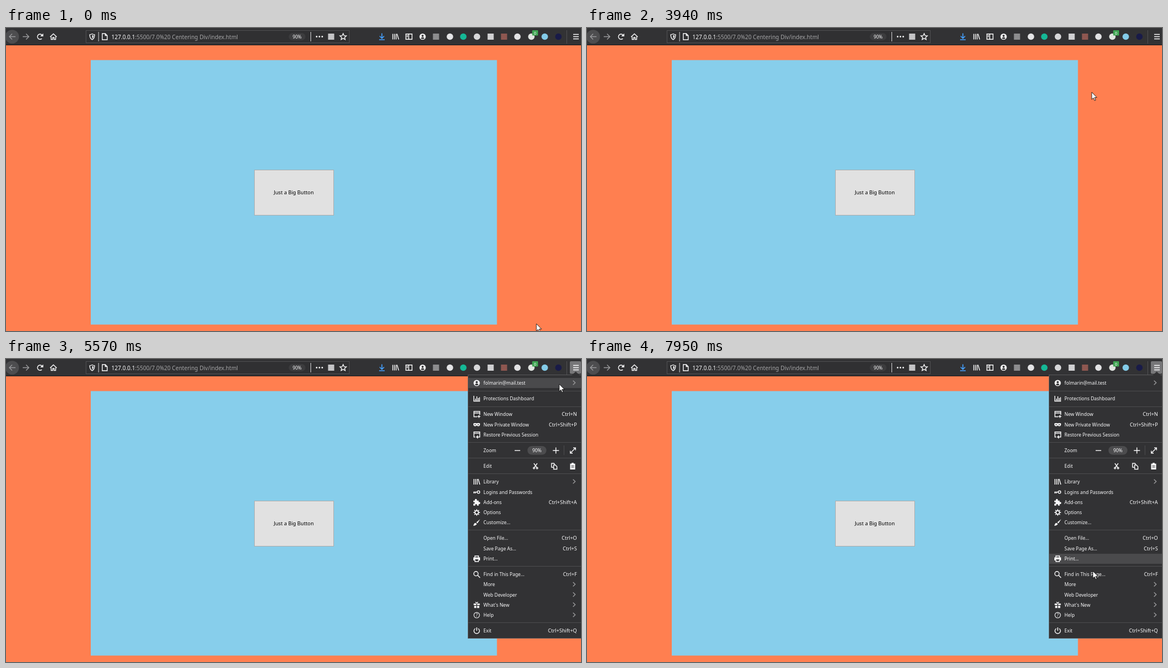
Recreate the animation shown at these times as an HTML page. Size 1031 px wide and 543 px high, loop 8000 ms.

```html
<!DOCTYPE html>
<html lang="en">
<head>
<meta charset="utf-8">
<title>Centering Div</title>
<style>
  html, body { margin: 0; width: 100%; height: 100%; overflow: hidden; background: #ff7f50; }
  svg { display: block; }
  text { font-family: "Noto Sans", "Open Sans", sans-serif; fill: #f9f9fa; white-space: pre; }
  .line { fill: none; stroke: #f9f9fa; stroke-width: 1.4; }
  .solid { fill: #f9f9fa; stroke: none; }
  .hole { fill: #323234; stroke: none; }
  .grey { stroke: #98989a; }
  #menu text { font-size: 8.45px; }
  #menu .key { font-size: 9.1px; text-anchor: end; }
</style>
</head>
<body>
<svg width="1031" height="543" viewBox="0 0 1031 543">
  <rect width="1031" height="543" fill="#ff7f50"/>
  <rect x="152" y="57.5" width="728.3" height="474" fill="#87ceeb"/>
  <rect id="big" x="445.5" y="254.5" width="142" height="81"/>
  <text x="516" y="298" font-size="9.2" text-anchor="middle" style="fill:#000">Just a Big Button</text>

  <rect width="1031" height="31" fill="#323234"/>
  <rect y="30" width="1031" height="1" fill="#1c1c1e"/>
  <circle cx="11" cy="15.5" r="12.3" fill="#4d4d4f"/>
  <rect x="143.5" y="4.5" width="472" height="22" fill="#303032" stroke="#505052"/>
  <rect x="507" y="9" width="30" height="13" rx="6.5" fill="#3c3c3e"/>
  <path d="M166 7V24M546.5 7V24" stroke="#d8d8da"/>
  <path d="M1005.5 4V28" stroke="#505052"/>
  <text x="189" y="19.6" font-size="10.06">127.0.0.1<tspan fill="#a4a4a6">:5500/7.0%20 Centering Div/index.html</tspan></text>
  <text x="522" y="18.6" font-size="8.1" text-anchor="middle">90%</text>
  <g id="bar"></g>
  <rect id="burger" x="1011" y="4" width="20" height="22.5" rx="2"/>
  <path class="line" d="M1017 11.5h10M1017 15.5h10M1017 19.5h10"/>

  <g id="menu">
    <rect x="828.5" y="28.5" width="204" height="472" fill="#323234" stroke="#58585a"/>
    <path class="late" d="M1014 29.5L1021.5 22.5L1029 29.5Z" fill="#323234"/>
    <rect id="hover" x="829" width="202" height="18" fill="#4a4a4c"/>
    <g id="items"></g>
  </g>
  <path id="cursor" d="M0 0V13L3 10.3L5.1 15L7.1 14.2L5 9.6H9.2Z" fill="#fff" stroke="#000" stroke-width=".8"/>
</svg>
<script>
const $ = id => document.getElementById(id);
const line = (d, cls = '') => `<path class="line ${cls}" d="${d}"/>`;
const solid = d => `<path class="solid" fill-rule="evenodd" d="${d}"/>`;
const at = (x, y, art, cls = '') => `<g class="${cls}" transform="translate(${x} ${y})">${art}</g>`;
const dot = (x, color) => `<circle cx="${x}" cy="15.5" r="5.8" fill="${color}"/>`;
const block = (x, color) => `<rect x="${x - 5.5}" y="10" width="11" height="11" fill="${color}"/>`;

const account = `<circle r="5.6" class="solid"/><circle cy="-1.5" r="1.9" class="hole"/>
  <path class="hole" d="M-3.2 3.2Q-2.6 1 0 1Q2.6 1 3.2 3.2Q0 5.4 -3.2 3.2Z"/>`;
const books = line('M-5 -5V5M-2 -5V5M1 -5V5M2.6 -5L5.6 5');
const frame = 'V-5H5.5V';
const icons = {
  account, books,
  chart: line('M-5.2 -5V4.5H6M-2.2 3.5V0M.3 3.5V-4M2.7 3.5V-1M5 3.5V-2.5'),
  window: line(`M1 4.5H-5${frame}1M-5 -2.3H5.5M4 1.5v5M1.5 4h5`),
  mask: solid('M-6 -2Q-3 -3.6 0 -2.2Q3 -3.6 6 -2Q6.2 3 3 3Q1.2 3 0 1.4Q-1.2 3 -3 3Q-6.2 3 -6 -2ZM-4.3 0Q-2.8 -1.8 -1.3 .3Q-3 1.6 -4.3 0ZM4.3 0Q2.8 -1.8 1.3 .3Q3 1.6 4.3 0Z'),
  restore: line(`M-2.5 4H-5${frame}4H0M-5 -2.3H5.5M2.2 1.5L-.3 4L2.2 6.5`),
  key: line('M1 0H-6M-5 0V2.5M-2.5 0V2.5') + '<circle class="line" cx="3.2" r="2.3"/>',
  puzzle: solid('M-6 -3H-3.2Q-4 -6 -1.5 -6Q1 -6 .2 -3H3.5V-.2Q6.4 -1 6.4 1.4Q6.4 3.8 3.5 3V6H.6Q1 3.4 -1 3.4Q-3 3.4 -2.6 6H-6V2.6Q-3.4 3 -3.4 1.2Q-3.4 -.6 -6 0Z'),
  gear: line('M0 -6V6M-6 0H6M-4.2 -4.2L4.2 4.2M-4.2 4.2L4.2 -4.2') + '<circle r="3.1" class="hole" style="stroke:#f9f9fa;stroke-width:1.6"/>',
  brush: solid('M6.2 -6.2L1.4 1.4L-.8 -.4ZM-6 5.8Q-5 .6 -2 .6L.2 2.4Q-.6 5 -6 5.8Z'),
  printer: line('M-3.3 -2V-5H3.3V-2') + solid('M-6 -2.4H6V3H3.6V1H-3.6V3H-6Z') + line('M-3.2 1.5V5H3.2V1.5'),
  search: '<circle class="line" cx="-1.3" cy="-1.3" r="3.9"/>' + line('M1.6 1.6L6 6'),
  gift: solid('M-5.5 -2.5H-.7V.3H-5.5ZM.7 -2.5H5.5V.3H.7ZM-4.5 1.5H-.7V5.5H-4.5ZM.7 1.5H4.5V5.5H.7Z') + line('M0 -3L-2.2 -5.2M0 -3L2.2 -5.2'),
  help: '<circle class="line" r="5" style="stroke-width:1.1"/><text y="3" text-anchor="middle">?</text>',
  power: line('M-2.6 -4A4.9 4.9 0 1 0 2.6 -4M0 -6V0')
};

$('bar').innerHTML =
  at(11, 15.5, line('M6 0H-5M0 -5L-5 0L0 5', 'grey')) +
  at(36, 15.5, line('M-6 0H5M0 -5L5 0L0 5', 'grey')) +
  at(61, 15.5, line('M3.2 3.4A4.6 4.6 0 1 1 3.6 -2.7') + solid('M5.8 -5.8V-.4H.4Z')) +
  at(85, 15.5, line('M-6 .5L0 -5L6 .5M-4 0V5H-1.2V1.5H1.2V5H4V0')) +
  at(154.5, 15.5, line('M0 -5Q2.5 -3.6 4.3 -3.6Q4.4 3 0 5.4Q-4.4 3 -4.3 -3.6Q-2.5 -3.6 0 -5Z') + solid('M0 -3Q2 -2 2.6 -2Q2.4 1.8 0 3.4Z')) +
  at(177, 15.5, line('M-4.4 -5.5H1L4.5 -2V5.5H-4.4ZM1 -5.5V-2H4.5')) +
  [557, 562, 567].map(x => `<circle class="solid" cx="${x}" cy="15.5" r="1.4"/>`).join('') +
  block(583, '#c4c4c6') +
  at(604.5, 15.5, line('M0 -5.6L1.7 -1.8L5.8 -1.4L2.7 1.3L3.6 5.2L0 3.1L-3.6 5.2L-2.7 1.3L-5.8 -1.4L-1.7 -1.8Z')) +
  at(674, 15.5, '<g style="fill:none;stroke:#45a1ff;stroke-width:1.6"><path d="M0 -6V3M-4 -1L0 3L4 -1M-5 5.5H5"/></g>') +
  at(698.5, 15.5, books) +
  at(722.5, 15.5, line('M-5.5 -4.8H5.5V4.8H-5.5ZM-.5 -4.8V4.8M-4 -2H-2M-4 0H-2')) +
  at(747, 15.5, account) +
  block(771, '#8c8c8e') + dot(796, '#e4e4e6') + dot(820, '#15b896') + dot(844.5, '#d6d6d8') +
  block(869, '#d0d0d2') + block(893, '#8e5750') + dot(917, '#e2e2e4') + dot(942, '#e0e4e0') +
  '<rect x="943.5" y="4" width="10.5" height="9.5" rx="1" fill="#3fa552"/><text x="948.7" y="11.5" font-size="7.5" text-anchor="middle">0</text>' +
  dot(966, '#83cbe8') + dot(990.5, '#191b48');

// y, label, shortcut ('>' opens a submenu), icon
const rows = [
  [43, 'folmarin@mail.test', '>', 'account'],
  [71, 'Protections Dashboard', '', 'chart'],
  [99, 'New Window', 'Ctrl+N', 'window'],
  [117.5, 'New Private Window', 'Ctrl+Shift+P', 'mask'],
  [135.7, 'Restore Previous Session', '', 'restore'],
  [164, 'Zoom'], [192, 'Edit'],
  [220, 'Library', '>', 'books'],
  [238.5, 'Logins and Passwords', '', 'key'],
  [256.7, 'Add-ons', 'Ctrl+Shift+A', 'puzzle'],
  [275, 'Options', '', 'gear'],
  [293.2, 'Customize...', '', 'brush'],
  [321.3, 'Open File...', 'Ctrl+O'],
  [339.6, 'Save Page As...', 'Ctrl+S'],
  [358, 'Print...', '', 'printer'],
  [386, 'Find in This Page...', 'Ctrl+F', 'search'],
  [404.3, 'More', '>'], [422.6, 'Web Developer', '>'],
  [440.8, "What's New", '>', 'gift'],
  [459, 'Help', '>', 'help'],
  [487, 'Exit', 'Ctrl+Shift+Q', 'power']
];
const early = ['account', 'books', 'puzzle', 'gear', 'search'];

$('items').innerHTML = rows.map(([y, label, key, icon]) =>
  `<text x="856" y="${y + 3}">${label}</text>` +
  (key === '>' ? at(1019, y - .5, line('M-2.3 -3.8L1.6 0L-2.3 3.8', 'grey'), 'late')
    : key ? `<text class="key" x="1023.7" y="${y + 3}">${key}</text>` : '') +
  (icon ? at(844, y, icons[icon], early.includes(icon) ? '' : 'late') : '')
).join('') +
  [57, 85, 149, 177, 205, 306, 371, 472].map(y => `<path d="M829 ${y + .5}H1031" stroke="#4c4c4e"/>`).join('') +
  '<path d="M1000.5 155V172" stroke="#4c4c4e"/><rect x="935" y="156" width="34" height="15.5" rx="7.7" fill="#4c4c4e"/>' +
  '<text x="952" y="167" text-anchor="middle">90%</text>' +
  at(917, 164, line('M-5 0H5'), 'late') +
  at(986, 164, line('M-5.5 0H5.5M0 -5.5V5.5'), 'late') +
  at(1016.5, 164, line('M-4.5 4.5L4.5 -4.5M.5 -4.7H4.7V-.5M-.5 4.7H-4.7V.5'), 'late') +
  at(949.5, 192, line('M-3 -5L2.2 2.5M3 -5L-2.2 2.5') + '<circle class="line" cx="-2.8" cy="3.6" r="1.3"/><circle class="line" cx="2.8" cy="3.6" r="1.3"/>', 'late') +
  at(983, 192, line('M-1.5 2H-4.8V-5H-.5L1 -3M-1 -2H2L4.8 .8V5.5H-1Z'), 'late') +
  at(1016, 192, solid('M-4.5 -4.5H-1.8V-6H1.8V-4.5H4.5V6H-4.5ZM-2.5 -1H2.5V0H-2.5ZM-2.5 1.5H2.5V2.5H-2.5Z'), 'late');

// start, end, steps, points along the way
const moves = [
  [0, 0, 1, [[951, 530]]],
  [70, 130, 2, [[912, 495], [885, 471]]],
  [2470, 3160, 10, [[815, 461], [762, 458], [735, 440], [706, 417], [663, 370], [626, 345], [590, 322], [565, 308], [550, 301], [545, 298]]],
  [3460, 3620, 3, [[573, 300], [645, 296], [755, 272]]],
  [3940, 4640, 10, [[905, 115], [950, 72], [980, 40], [998, 20], [1007, 10]]],
  [4870, 4870, 1, [[1017, 13]]],
  [5020, 5020, 1, [[1017, 19]]],
  [5570, 6340, 11, [[992, 45], [968, 92], [946, 152], [925, 212], [908, 257], [900, 273]]],
  [6420, 6650, 4, [[900, 274], [902, 275]]],
  [7180, 7950, 11, [[912, 221], [916, 172], [918, 140], [918, 133], [917, 150], [916, 178], [914, 215], [912, 258], [910, 300], [908, 342], [907, 380]]]
];
const path = moves.flatMap(([start, end, steps, pts]) => Array.from({ length: steps }, (_, i) => {
  const u = i / Math.max(1, steps - 1), s = u * (pts.length - 1), k = Math.floor(s);
  const a = pts[k], b = pts[k + 1] || a, mix = j => Math.round(a[j] + (b[j] - a[j]) * (s - k));
  return { time: Math.round(start + u * (end - start)), x: mix(0), y: mix(1) };
}));

function draw(t) {
  const n = path.findLastIndex(p => p.time <= t), { x, y } = path[n];
  $('cursor').setAttribute('transform', `translate(${x} ${y})`);

  const over = x > 445 && x < 587 && y > 254 && y < 335;
  $('big').setAttribute('fill', over ? '#e5f1fb' : '#e1e1e1');
  $('big').setAttribute('stroke', over ? '#0078d7' : '#adadad');
  $('burger').setAttribute('fill', t >= 5020 ? '#767678' : x > 1004 && y < 28 ? '#505052' : 'none');

  const fade = t < 5097 ? 0 : t < 5173 ? .24 : t < 5250 ? .72 : 1;
  $('menu').setAttribute('opacity', fade);
  $('menu').setAttribute('transform', `translate(0 ${fade < .5 ? -2 : fade < 1 ? -1 : 0})`);
  document.querySelectorAll('.late').forEach(e => e.style.display = fade > .5 ? '' : 'none');

  // the highlight trails the pointer by about half a step
  const lag = y * .48 + path[Math.max(0, n - 1)].y * .52;
  const row = rows.reduce((a, b) => Math.abs(b[0] - lag) < Math.abs(a[0] - lag) ? b : a);
  const lit = t >= 5570 && Math.abs(row[0] - lag) < 12 && !['Zoom', 'Edit'].includes(row[1]);
  $('hover').setAttribute('y', Math.round(row[0] - 9.2));
  $('hover').style.display = lit ? '' : 'none';
}
(function tick() {
  draw(performance.now() % 8000);
  requestAnimationFrame(tick);
})();
</script>
</body>
</html>
```
